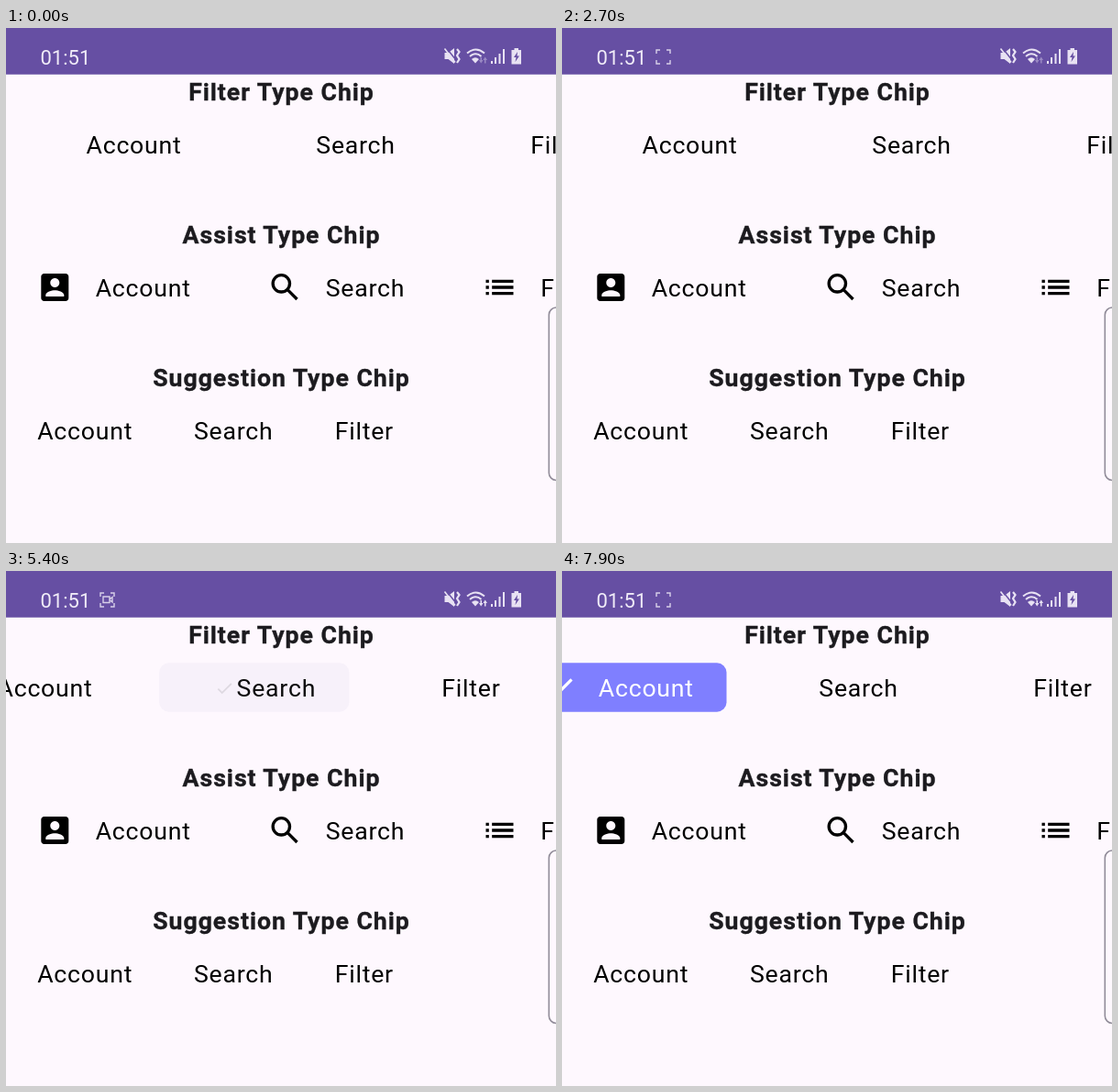
Animation, 600 px wide and 562 px high, one loop 8 s. Source, as an HTML page:

```html
<!DOCTYPE html>
<html lang="en">
<head>
<meta charset="utf-8">
<title>Chip types</title>
<style>
html, body { margin: 0; width: 100%; height: 100%; overflow: hidden; background: #fef8fe; }
svg { display: block; }
text { font: 26.67px Roboto, sans-serif; letter-spacing: .77px; }
.title { font-weight: 700; letter-spacing: .97px; fill: #1c1b1f; stroke: #1c1b1f; stroke-width: .35; text-anchor: middle; }
.clock { font-size: 22px; letter-spacing: 0; fill: #f0ecf8; }
.line { fill: none; stroke: #e8e2f3; stroke-width: 1.6; }
</style>
</head>
<body>
<svg width="600" height="562" viewBox="0 0 600 562">
  <rect width="600" height="50.7" fill="#664fa3"/>
  <text class="clock" x="37.5" y="39.7">01:51</text>
  <g id="rec" class="line" style="stroke:#d8d0e9;stroke-width:1.4">
    <path d="M103 28v-4h4M114 24h4v4M118 35v4h-4M107 39h-4v-4"/>
    <path id="camera" d="M106 28h7v6.500h-7zM113 31l3-2.500v5.500l-3-2.500"/>
  </g>
  <g fill="#e8e2f3">
    <path d="M478.500 27h4l6.500-5v17l-6.500-5h-4z"/>
    <path d="M480.500 22l10.500 13" stroke="#664fa3" stroke-width="1.500"/>
    <path class="line" d="M478.500 22.500l11.500 15"/>
    <path class="line" style="stroke-width:2.200" d="M492 23l2.500 3-2.500 4 2.500 4-2.500 4"/>
    <path class="line" style="stroke-width:2" d="M503 27.500q9.500-8 19 0M506 31q6.500-5.500 12.500 0"/>
    <path d="M508 34q4-3.500 8 0l-4 4.500z"/>
    <path id="arrows" d="M516 35h1.500v-3h1.500v3h1.500l-2.300 3.500zM520.500 35l2.200-3.500 2.300 3.500h-1.500v3.500h-1.500v-3.500z"/>
    <path d="M529 36h2v3h-2zM533 32h2v7h-2zM537.500 28h2v11h-2zM542 23h2v16h-2z"/>
    <path d="M554.500 22h4.500v2h3v15.500h-10.500v-15.500h3z"/>
    <path d="M558 26l-4 6h2.500l-1 5 4.500-6.500h-2.500z" fill="#664fa3"/>
  </g>

  <text class="title" x="300.500" y="79.300">Filter Type Chip</text>
  <text class="title" x="300.500" y="235.300">Assist Type Chip</text>
  <text class="title" x="300.500" y="391.300">Suggestion Type Chip</text>

  <g id="row"></g>

  <g transform="translate(33.300 263) scale(1.667)">
    <path d="M3 5v14c0 1.100.89 2 2 2h14c1.100 0 2-.9 2-2V5c0-1.100-.9-2-2-2H5c-1.110 0-2 .9-2 2zM15 9c0 1.660-1.340 3-3 3s-3-1.340-3-3 1.340-3 3-3 3 1.340 3 3zM6 17c0-2 4-3.100 6-3.100s6 1.100 6 3.100v1H6z" fill-rule="evenodd"/>
  </g>
  <g transform="translate(284.500 263) scale(1.667)" fill="none" stroke="#000" stroke-width="2">
    <circle cx="9.500" cy="9.500" r="5.500"/>
    <path d="M13.600 13.600l6.200 6.200"/>
  </g>
  <path transform="translate(518.500 263) scale(1.667)" d="M3 7h2v2H3zM3 11h2v2H3zM3 15h2v2H3zM7 7h14v2H7zM7 11h14v2H7zM7 15h14v2H7z"/>
  <text x="97.700" y="293">Account</text>
  <text x="348.700" y="293">Search</text>
  <text x="583.200" y="293">Filter</text>

  <text x="34.200" y="449">Account</text>
  <text x="205" y="449">Search</text>
  <text x="358.700" y="449">Filter</text>

  <rect x="592.300" y="305" width="60" height="188.500" rx="8" fill="none" stroke="#918c99" stroke-width="1.600"/>
</svg>
<script>
const $ = id => document.getElementById(id);
const clamp = x => Math.min(1, Math.max(0, x));
const ramp = (t, a, b) => clamp((t - a) / (b - a));
const ease = (t, a, b) => { const u = ramp(t, a, b); return u * u * (3 - 2 * u); };

const BLANK = [254, 248, 254], MID = [184, 178, 216], FULL = [127, 127, 255];
const mix = (a, b, u) => `rgb(${a.map((v, i) => Math.round(v + (b[i] - v) * u))})`;
const chipColor = p => p < .5 ? mix(BLANK, MID, p * 2) : mix(MID, FULL, p * 2 - 1);

const CHECK = 'M9 16.17L4.83 12l-1.42 1.41L9 19 21 7l-1.41-1.41z';

function makeChip(label, left, width, pad) {
  const g = document.createElementNS('http://www.w3.org/2000/svg', 'g');
  const box = `x="${left}" y="100.3" width="${width}" height="53.4" rx="10.5"`;
  g.innerHTML = `<rect ${box}/><rect ${box}/><path d="${CHECK}"/><text y="137">${label}</text>`;
  $('row').append(g);
  const [fill, ripple, check, text] = g.children;
  // p: how far selected, press: strength of the touch shade
  return (p, press) => {
    const ink = mix([0, 0, 0], [255, 255, 255], p);
    const s = Math.min(1, .52 + .55 * p);
    fill.setAttribute('fill', chipColor(p));
    fill.setAttribute('opacity', p > 0 ? 1 : 0);
    ripple.setAttribute('opacity', press * .3);
    check.setAttribute('transform',
      `translate(${left + 42 + (1 - s) * 65} 128.3) scale(${s * 1.64}) translate(-12.2 -12.3)`);
    check.setAttribute('fill', ink);
    check.setAttribute('opacity', Math.min(1, 2 * p));
    text.setAttribute('x', left + pad + (p > 0 ? 10.3 : 0));
    text.setAttribute('fill', ink);
  };
}

const account = makeChip('Account', 13.2, 224.3, 74.3);
const search = makeChip('Search', 264.2, 207.2, 74.1);
makeChip('Filter', 498, 185, 74.3)(0, 0);

// Selection value reached in each successive 100 ms step
const SELECT = [0, .5, .88, 1];
const DESELECT = [1, .5, .05, 0];
const step = (values, t, start) => values[Math.min(3, Math.max(0, Math.floor((t - start) / 100) + 1))];

function scrollAt(t) {
  return -97 * ease(t, 1500, 2250) + 97 * ease(t, 2400, 2700)
    - 97 * ease(t, 2800, 3300) + 96 * ease(t, 6000, 6400)
    - 57 * ramp(t, 7700, 7900) ** 1.3;
}

function draw(now) {
  const t = Math.floor(now % 8000 / 100) * 100;
  $('row').setAttribute('transform', `translate(${scrollAt(t)} 0)`);
  account(step(SELECT, t, 6800), t < 1500 ? 0 : 1 - ramp(t, 1500, 1800));
  search(t < 5000 ? step(SELECT, t, 4300) : step(DESELECT, t, 5300), t === 4200 ? .5 : 0);
  $('rec').setAttribute('opacity', t < 100 ? 0 : 1);
  $('camera').setAttribute('opacity', (t + 900) % 1000 < 500 ? 1 : 0);
  $('arrows').setAttribute('opacity', t < 3500 ? .4 : 1);
  requestAnimationFrame(() => draw(performance.now() - origin));
}
const origin = performance.now();
draw(0);
</script>
</body>
</html>
```
